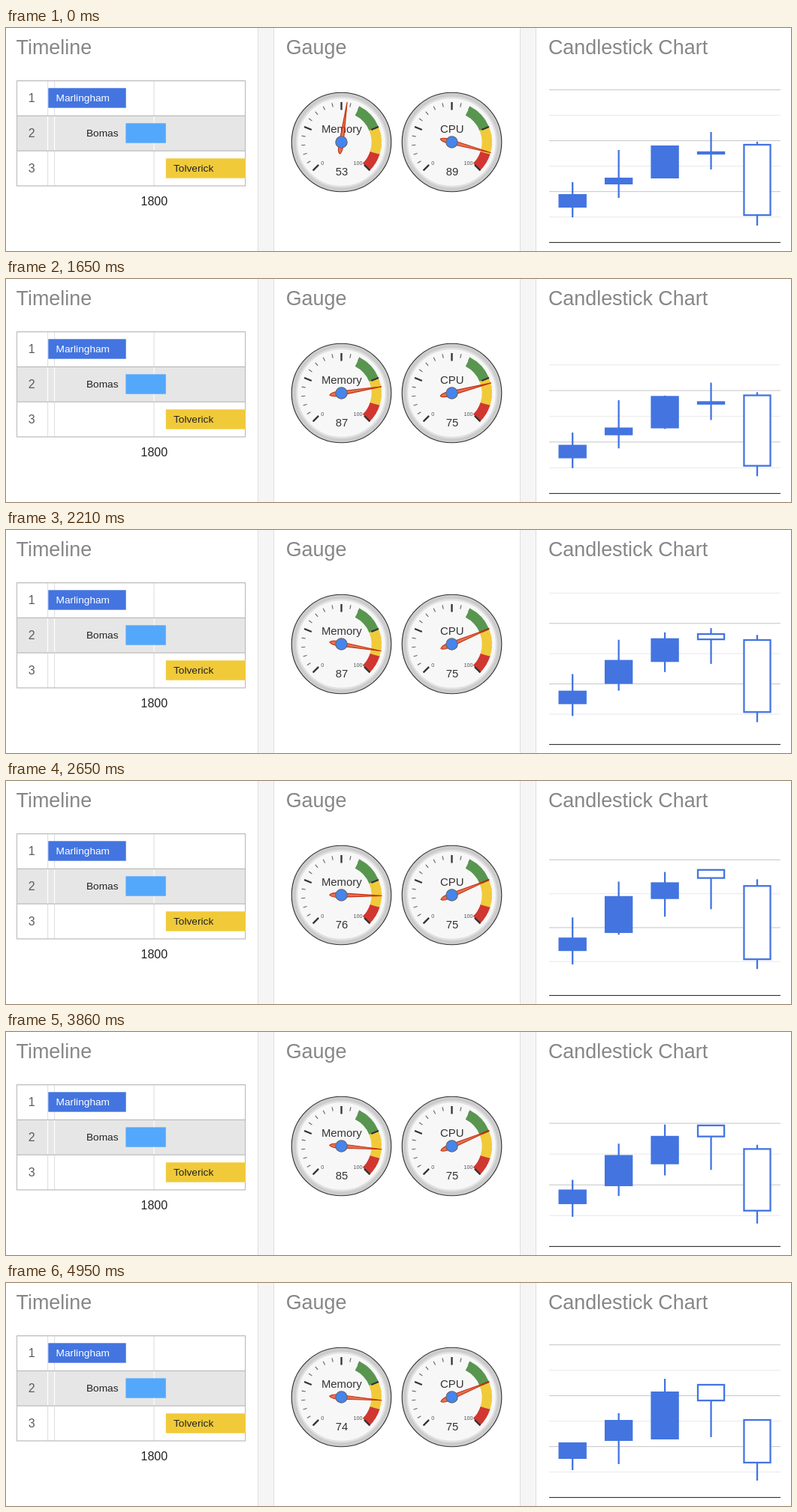
Write an HTML page with a canvas that moves like this. It is 1045 px wide and 298 px high and loops after 5.07 s.

```html
<!DOCTYPE html>
<html lang="en">
<head>
<meta charset="utf-8">
<title>Chart gallery</title>
<style>
  html, body { margin: 0; width: 100%; height: 100%; overflow: hidden; background: #fff; }
  canvas { display: block; }
</style>
</head>
<body>
<canvas id="stage" width="1045" height="298"></canvas>
<script>
const ctx = document.getElementById('stage').getContext('2d');
const LOOP = 5070;
const BLUE = '#4374e0', YELLOW = '#f1ca3a';
const HAIR = 1.14;

const clamp = v => Math.max(0, Math.min(1, v));
const mix = (a, b, p) => a + (b - a) * p;

function rect(x, y, w, h, color) {
  ctx.fillStyle = color;
  ctx.fillRect(x, y, w, h);
}

function text(str, x, y, size, color, align = 'left') {
  ctx.font = `${size}px "Liberation Sans", Arial, sans-serif`;
  ctx.textAlign = align;
  ctx.fillStyle = color;
  ctx.fillText(str, x, y);
}

// The charts redraw at a coarse, even rate while they animate.
const FIRST = 1190, LAST = 4520, STEP = 111;

function heldTime(t) {
  if (t < FIRST) return 0;
  return Math.min(LAST, FIRST + STEP * Math.floor((t - FIRST) / STEP));
}

function panels() {
  rect(0, 0, 1045, 298, '#fff');
  for (const x of [335, 684]) {
    rect(x, 0, 22, 298, '#dedede');
    rect(x + 1, 0, 20, 298, '#f5f5f5');
  }
  ['Timeline', 'Gauge', 'Candlestick Chart'].forEach((title, i) =>
    text(title, 13.5 + i * 359.2 - 5 * i * (i - 1), 35.2, 26.9, '#878787'));
}

function bar(row, left, right, color) {
  rect(left, 33.3 + 47 * row, right - left, 26.4, color);
}

function timeline() {
  rect(14, 117, 305, 47, '#e6e6e6');
  for (const x of [55, 64, 196.5]) {
    rect(x, 71, HAIR, 140, '#e0e0e0');
    rect(x, 117, HAIR, 47, '#fff');
  }
  for (let y = 70; y < 212; y += 46.8) rect(14, y, 305, HAIR, '#b7b7b7');
  for (const x of [14, 318]) rect(x, 70, 1, 141, '#b7b7b7');

  bar(1, 56.3, 159.7, BLUE);
  bar(2, 159.4, 212.8, '#53a8fb');
  bar(3, 212.8, 319, YELLOW);
  text('Marlingham', 66.5, 98, 13.7, '#fff');
  text('Bomas', 149.5, 145, 13.7, '#222', 'right');
  text('Tolverick', 223, 192, 13.7, '#222');
  for (let n = 1; n <= 3; n++) text(n, 34.3, 52 + 47 * n, 16, '#5c5c5c', 'center');
  text('1800', 197.3, 237, 16, '#222', 'center');
}

const gaugeAngle = v => (-135 + 2.7 * v) * Math.PI / 180;

function disc(r, fill, stroke, width) {
  ctx.beginPath();
  ctx.arc(0, 0, r, 0, Math.PI * 2);
  ctx.fillStyle = fill;
  ctx.fill();
  ctx.strokeStyle = stroke;
  ctx.lineWidth = width;
  ctx.stroke();
}

function band(from, to, color) {
  const quarter = Math.PI / 2;
  ctx.beginPath();
  ctx.arc(0, 0, 46.8, gaugeAngle(from) - quarter, gaugeAngle(to) - quarter);
  ctx.strokeStyle = color;
  ctx.lineWidth = 13.4;
  ctx.stroke();
}

function tick(v, major) {
  const a = gaugeAngle(v), inner = major ? 43 : 48.3;
  ctx.beginPath();
  ctx.moveTo(Math.sin(a) * inner, -Math.cos(a) * inner);
  ctx.lineTo(Math.sin(a) * 53.5, -Math.cos(a) * 53.5);
  ctx.strokeStyle = major ? '#333' : '#666';
  ctx.lineWidth = major ? 2 * HAIR : HAIR;
  ctx.stroke();
}

function needle(v) {
  ctx.save();
  ctx.rotate(gaugeAngle(v));
  ctx.beginPath();
  ctx.moveTo(0, -54);
  ctx.lineTo(3, 6);
  ctx.quadraticCurveTo(2.8, 13.5, 0, 15.8);
  ctx.quadraticCurveTo(-2.8, 13.5, -3, 6);
  ctx.closePath();
  ctx.fillStyle = 'rgba(220, 57, 18, 0.7)';
  ctx.fill();
  ctx.strokeStyle = '#c63310';
  ctx.lineWidth = HAIR;
  ctx.stroke();
  ctx.restore();
}

// The number jumps at `shown`; the needle follows from `start`.
const MEMORY = [
  { shown: 0, start: 0, value: 53 },
  { shown: 540, start: 1080, value: 87 },
  { shown: 2420, start: 2420, value: 76 },
  { shown: 3300, start: 3150, value: 85 },
  { shown: 4950, start: LOOP, value: 74 }
];
const CPU = [
  { shown: 0, start: 0, value: 89 },
  { shown: FIRST, start: 1080, value: 75 }
];
const SWEEP = 700;

function gauge(x, label, readings, t, held) {
  const current = readings.filter(r => r.shown <= t).pop();
  const pointed = readings.reduce(
    (v, r) => mix(v, r.value, clamp((held - r.start) / SWEEP)), readings[0].value);
  ctx.save();
  ctx.translate(x, 152.5);
  disc(66.3, '#ccc', '#333', HAIR);
  disc(59.5, '#f7f7f7', '#e0e0e0', 2 * HAIR);
  for (let i = 0; i <= 20; i++) tick(i * 5, false);
  band(60, 75, '#58964f');
  band(75, 90, YELLOW);
  band(90, 100, '#d13630');
  for (let v = 0; v <= 100; v += 25) tick(v, true);
  text(label, 0.3, -12.5, 14.9, '#333', 'center');
  text('0', -25.3, 30.5, 7.2, '#555', 'center');
  text('100', 22, 30.5, 7.2, '#555', 'center');
  text(current.value, 0.4, 44.8, 14.8, '#333', 'center');
  needle(pointed);
  disc(7.7, '#4684ee', '#666', HAIR);
  ctx.restore();
}

// Key poses: high, top, bottom and low of each candle.
const START = [
  [206, 222, 240, 253], [163, 200, 209, 227], [157, 157, 201, 201],
  [139, 166, 168, 189], [152, 156, 250, 264]
];
const PEAK = [
  [182, 209, 227, 245], [134, 153, 203, 205], [121, 135, 157, 181],
  [125, 118, 129, 171], [131, 140, 238, 251]
];
const END = [
  [223, 213, 235, 250], [174, 183, 211, 242], [128, 145, 209, 209],
  [136, 136, 157, 206], [183, 183, 240, 264]
];
const RISE_AT = 1600, PEAK_AT = 2650;
const BASE = 286;

function candle(x, [high, top, bottom, low], hollow) {
  const half = 18.7, line = 2 * HAIR;
  const from = Math.min(high, top), to = Math.max(low, bottom);
  rect(x - line / 2, from, line, to - from, BLUE);
  if (hollow) {
    rect(x - half, top, 2 * half, bottom - top, '#fff');
    ctx.strokeStyle = BLUE;
    ctx.lineWidth = line;
    ctx.strokeRect(x - half + line / 2, top, 2 * half - line, bottom - top);
  } else {
    rect(x - half, top, 2 * half, bottom - top, BLUE);
  }
}

function candles(held) {
  const rise = clamp((held - RISE_AT) / (PEAK_AT - RISE_AT));
  const u = clamp((held - PEAK_AT) / (LAST - PEAK_AT));
  const fall = u * (0.3 + 0.7 * u * u);
  const blend = (a, b, c) => mix(mix(a, b, rise), c, fall);

  const spacing = blend(34, 45.5, 34);
  for (let k = 1; k <= 6; k++) {
    const y = BASE - k * spacing;
    if (y >= 82) rect(723, y, 308, HAIR, k % 2 ? '#ebebeb' : '#ccc');
  }
  rect(723, BASE, 308, HAIR, '#333');
  START.forEach((ys, i) => {
    const pose = ys.map((y, j) => blend(y, PEAK[i][j], END[i][j]));
    candle(754.2 + 61.45 * i, pose, i > 2);
  });
}

const began = performance.now();

function draw() {
  const t = (performance.now() - began) % LOOP;
  const held = heldTime(t);
  panels();
  timeline();
  gauge(446.5, 'Memory', MEMORY, t, held);
  gauge(593.5, 'CPU', CPU, t, held);
  candles(held);
  requestAnimationFrame(draw);
}
draw();
</script>
</body>
</html>
```
